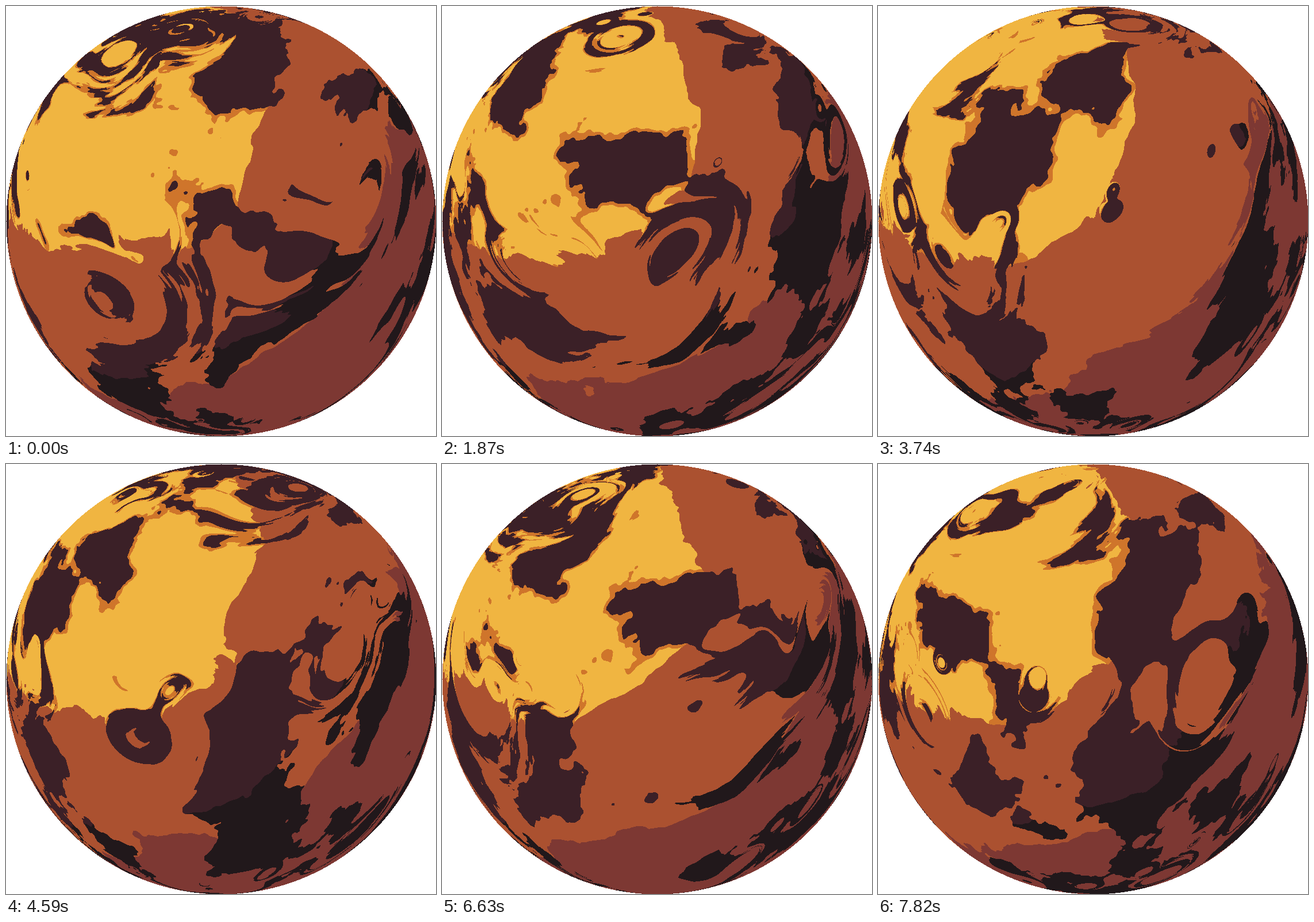
An HTML page with a canvas for the animation above (7990 ms loop, 748 px wide and 748 px high).

```html
<!DOCTYPE html>
<html lang="en">
<head>
<meta charset="utf-8">
<title>Gas planet</title>
<style>
  html, body { margin: 0; width: 100%; height: 100%; overflow: hidden; background: #fff; }
  canvas { display: block; width: 100vw; height: 100vh; }
</style>
</head>
<body>
<canvas id="planet" width="748" height="748"></canvas>
<script>
const PIXELS = 748;
const SIZE = 9;
const SEED = 5.94;
const OCTAVES = 5;
const COVER = 0.394;
const OUTLINE = 0.03;
const CURVE = 1.3;
const LIGHT = 0.25;
const STEP_MS = 170;
const STEPS = 47;
const TURN = 30;      // steps per full rotation
const RESTART = 3;    // the rotation starts over after this many steps

// 32-bit ABGR from a hex colour
const abgr = hex => {
  const n = parseInt(hex, 16);
  return (0xff000000 | (n & 255) << 16 | (n & 0xff00) | n >> 16) >>> 0;
};
const [BRIGHT, EDGE, SHADE, DEEP, DARK, BLACK] =
  ['f0b541', 'cf752b', 'ab5130', '7d3833', '3b2027', '21181b'].map(abgr);

const smooth = x => x * x * (3 - 2 * x);

// Lattice of seeded random values, repeating every SIZE cells
const lattice = new Float64Array(SIZE * SIZE);
for (let y = 0; y < SIZE; y++) {
  for (let x = 0; x < SIZE; x++) {
    const r = Math.sin(Math.fround(x * 12.9898 + y * 78.233)) * 15.5453 * SEED;
    lattice[y * SIZE + x] = r - Math.floor(r);
  }
}

function noise(x, y) {
  const ix = Math.floor(x), iy = Math.floor(y);
  const x0 = ix % SIZE, x1 = (ix + 1) % SIZE;
  const y0 = iy % SIZE * SIZE, y1 = (iy + 1) % SIZE * SIZE;
  const sx = smooth(x - ix), sy = smooth(y - iy);
  const top = lattice[y0 + x0] + (lattice[y0 + x1] - lattice[y0 + x0]) * sx;
  const low = lattice[y1 + x0] + (lattice[y1 + x1] - lattice[y1 + x0]) * sx;
  return top + (low - top) * sy;
}

function fbm(x, y) {
  let sum = 0, scale = 0.5;
  for (let i = 0; i < OCTAVES; i++) {
    sum += noise(x, y) * scale;
    x *= 2;
    y *= 2;
    scale *= 0.5;
  }
  return sum;
}

// Round storm cells: 1 outside, falling to 0 in the middle
function storm(x, y) {
  const row = Math.floor(y);
  x += row * 0.31;
  const col = Math.floor(x);
  const h = lattice[row % SIZE * SIZE + col % SIZE];
  const mid = 0.25 + h * 0.5;
  const dx = x - col - mid, dy = y - row - mid;
  const d = (dx * dx + dy * dy) * 0.5625;
  const r = h * 0.25;
  return d >= r * r ? 1 : smooth(Math.sqrt(d) / r);
}

function cloud(u, v, t) {
  const x = u * SIZE, y = v * SIZE;
  let swirl = 0;
  for (let i = 11; i < 20; i++) swirl += storm(x * 0.3 + i + t, y * 0.3 + i);
  return fbm(x + swirl + t, y + swirl);
}

function colour(c, light) {
  const lit = light + c * 0.2;
  if (c < COVER) return lit > 0.666 ? BLACK : DARK;
  if (lit > 0.746) return DEEP;
  if (lit > 0.439) return SHADE;
  return c < COVER + OUTLINE ? EDGE : BRIGHT;
}

// Surface position and distance to the light for every pixel of the disc
const disc = [];
for (let j = 0; j < PIXELS; j++) {
  for (let i = 0; i < PIXELS; i++) {
    const x = i / PIXELS, y = j / PIXELS;
    const cx = x * 2 - 1, cy = y * 2 - 1;
    const rr = cx * cx + cy * cy;
    if (rr > 1) continue;
    const k = 0.5 / (1 + Math.sqrt(1 - rr));
    const u = cx * k + 0.5;
    const v = cy * k + 0.5 + smooth(Math.abs(u - 0.4) / CURVE);
    disc.push(j * PIXELS + i, u, v, Math.hypot(x - LIGHT, y - LIGHT));
  }
}
const surface = Float64Array.from(disc);
disc.length = 0;

const ctx = document.getElementById('planet').getContext('2d');
const cache = [];

function view(turn) {
  if (cache[turn]) return cache[turn];
  const image = ctx.createImageData(PIXELS, PIXELS);
  const out = new Uint32Array(image.data.buffer).fill(0xffffffff);
  const t = turn * SIZE / TURN;
  for (let i = 0; i < surface.length; i += 4) {
    out[surface[i]] = colour(cloud(surface[i + 1], surface[i + 2], t), surface[i + 3]);
  }
  return cache[turn] = image;
}

const turnAt = step => (step < RESTART ? step : step - RESTART) % TURN;

const start = performance.now();
let shown = -1;

function draw() {
  const step = Math.floor((performance.now() - start) / STEP_MS) % STEPS;
  if (step !== shown) {
    shown = step;
    ctx.putImageData(view(turnAt(step)), 0, 0);
    // prepare the coming view while this one is on screen
    setTimeout(() => view(turnAt((step + 1) % STEPS)), 0);
  }
  requestAnimationFrame(draw);
}
draw();
</script>
</body>
</html>
```
